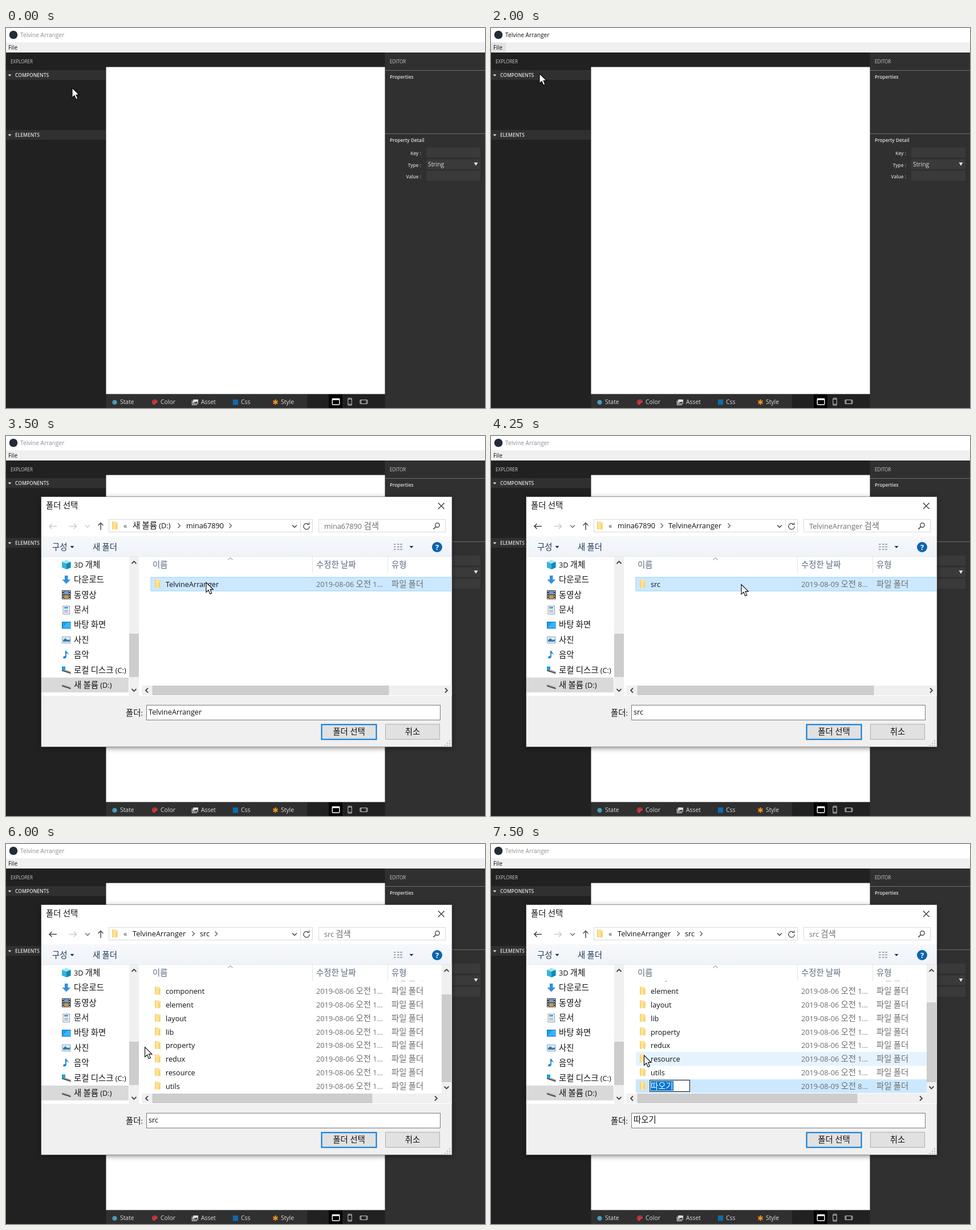
Animation of 840 by 667 pixels, one loop 8000 ms. Source, as an HTML page:

```html
<!DOCTYPE html>
<html lang="ko">
<head>
<meta charset="utf-8">
<title>Folder picker</title>
<style>
html, body { margin: 0; width: 100%; height: 100%; overflow: hidden; background: #212121; }
svg { display: block; width: 100%; height: 100%; }
text { font-family: 'Open Sans', 'Noto Sans CJK KR', 'Noto Sans CJK', 'Noto Sans', sans-serif; white-space: pre; }
.shadow { filter: drop-shadow(0 2px 5px rgba(0,0,0,.5)); }
</style>
</head>
<body>
<svg id="stage" viewBox="0 0 840 667">
  <defs>
    <clipPath id="listClip"><rect x="234" y="240.5" width="547" height="197.5"/></clipPath>
    <linearGradient id="bar" x2="0" y2="1"><stop stop-color="#f6f8fb"/><stop offset="1" stop-color="#eff3f9"/></linearGradient>
    <linearGradient id="gold"><stop stop-color="#f2c95c"/><stop offset=".3" stop-color="#ffe79f"/><stop offset="1" stop-color="#fbd980"/></linearGradient>
  </defs>
  <g id="app"></g><g id="head"></g><g id="dialog"></g><g id="content"></g>
  <path id="cursor" d="M0 0V17.3L4 13.5L6.8 20.2L9.8 18.9L7 12.4H12.3Z" fill="#fff" stroke="#000" stroke-width="1.1"/>
</svg>
<script>
const STEP = 250, LOOP = 8000;
const APP = 'Telvine Arranger', ROOT = 'TelvineArranger', USER = 'mina67890';
const ROW = 23.8;
const $ = id => document.getElementById(id);

const rect = (x, y, w, h, fill, extra = '') =>
  `<rect x="${x}" y="${y}" width="${w}" height="${h}" fill="${fill}" ${extra}/>`;
const box = (x, y, w, h, fill, line, lw = 1) =>
  rect(x + lw / 2, y + lw / 2, w - lw, h - lw, fill, `stroke="${line}" stroke-width="${lw}"`);
const line = (d, color, w = 1) => `<path d="${d}" fill="none" stroke="${color}" stroke-width="${w}"/>`;
const shape = (d, fill) => `<path d="${d}" fill="${fill}"/>`;
const dot = (x, y, r, fill) => `<circle cx="${x}" cy="${y}" r="${r}" fill="${fill}"/>`;
const text = (x, y, s, size, fill, extra = '') =>
  `<text x="${x}" y="${y}" font-size="${size}" fill="${fill}" ${extra}>${s}</text>`;
// Hangul is set a little larger than the Latin beside it
const label = (x, y, s, fill = '#111', extra = '') =>
  text(x, y, s.replace(/[가-힣]+/g, k => `<tspan font-size="14.4">${k}</tspan>`), 12.7, fill, extra);

const chevrons = { left: [3, -4, -1, 0, 3, 4], right: [-2, -4, 2, 0, -2, 4], up: [-4, 2, 0, -2, 4, 2], down: [-4, -2, 0, 2, 4, -2] };
const chevron = (x, y, dir, color = '#444', w = 1.5) => {
  const [a, b, c, d, e, f] = chevrons[dir];
  return line(`M${x + a} ${y + b}L${x + c} ${y + d}L${x + e} ${y + f}`, color, w);
};
const triangle = (x, y, w, h, fill) => shape(`M${x - w} ${y}h${2 * w}l${-w} ${h}z`, fill);
const arrow = (x, y, dir, color) =>
  line(`M${x - 6.5} ${y}h13M${x + dir * 2} ${y - 4.5}l${dir * 4.5} 4.5l${-dir * 4.5} 4.5`, color, 1.6);
const folder = (x, y) => shape(`M${x} ${y}h7l1 2h2v12H${x}z`, 'url(#gold)') +
  line(`M${x + 7.5} ${y + 5}v9`, '#eabf55', .8);

function drawApp() {
  const bold = 'font-weight="600"', right = 'text-anchor="end" font-weight="600"';
  const section = (y, s) => rect(0, y, 175, 17, '#303030') + triangle(6.5, y + 7.5, 3, 3.5, '#ddd') +
    text(16, y + 11.7, s, 8.5, '#ddd', bold);
  const tab = (x, s) => text(x, 660, s, 10.4, '#ddd');
  const field = (y, s) => text(728, y + 13, s, 8.3, '#ccc', right) + rect(737, y, 95, 17, '#3a3a3a');
  const spokes = [0, 60, 120].map(a => `<path d="M472.5 652v9.4" stroke="#f7941d" stroke-width="2" transform="rotate(${a} 472.5 656.7)"/>`).join('');
  return rect(0, 0, 840, 667, '#212121') + rect(0, 0, 840, 26, '#fff') + rect(0, 25, 840, 18, '#f0f0f0') +
    text(8, 61.5, 'EXPLORER', 8.1, '#ccc') + section(74, 'COMPONENTS') + section(179, 'ELEMENTS') +
    rect(664.5, 43, 175.5, 624, '#303030') + rect(175.5, 643, 352.5, 24, '#303030') +
    rect(175.5, 68.5, 489, 574, '#fff') +
    text(673, 61.5, 'EDITOR', 8.1, '#ccc') +
    line('M665 74.5H840M665 185.5H840', '#707070') +
    text(673, 89, 'Properties', 8.3, '#ddd', bold) + text(673, 200, 'Property Detail', 8.3, '#ddd', bold) +
    field(210, 'Key :') + field(230.5, 'Type :') + field(251, 'Value :') +
    text(740, 243, 'String', 10.4, '#ddd') + triangle(824, 236, 3.5, 6, '#ddd') +
    rect(566, 643, 24, 24, '#000') +
    dot(190.5, 657, 4, '#4a9fb8') + tab(200, 'State') +
    shape('M261 652c3 0 5 2 4.8 4.5c-.3 2-3 1-3.6 2.5c-.4 1.5-.5 2.5-2 2.4c-2.5-.2-4.4-2.4-4.3-5c.1-2.6 2.3-4.4 5.1-4.4z', '#d0383e') +
    [[258, 657], [259.3, 654.4], [262.5, 654.2]].map(p => dot(...p, .8, '#303030')).join('') + tab(271, 'Color') +
    rect(328, 652, 9, 8, '#ddd', 'rx="1"') + line('M326.5 654v7.5h8.5', '#ddd', 1.2) +
    shape('M329 659l2.5-3l1.5 1.5l1.5-2.5l2 4z', '#303030') + tab(342, 'Asset') +
    rect(398, 652, 9, 9.5, '#0c6cb0') + tab(412, 'Css') + spokes + tab(482, 'Style') +
    rect(572.2, 650.7, 12.6, 10.6, 'none', 'rx="1.5" stroke="#fff" stroke-width="1.4"') + rect(572, 650, 13, 3.2, '#fff') +
    rect(599.8, 649.6, 6.4, 12.8, 'none', 'rx="1" stroke="#ccc"') + line('M600 651.5h6M600 660.3h6', '#ccc') +
    rect(620.8, 652.8, 13, 6.8, 'none', 'rx="1" stroke="#ccc"') + line('M622.5 653v6.5M632.2 653v6.5', '#ccc');
}

function drawNav() {
  const names = ['3D 개체', '다운로드', '동영상', '문서', '바탕 화면', '사진', '음악', '로컬 디스크 (C:)', '새 볼륨 (D:)'];
  const y = i => 226 + i * 26.4;
  const drive = c => shape(`M98 ${c + 1}l3-1l12.5 4v4z`, '#c4c4c4') + shape(`M98 ${c + 1}l15.5 5v2.5l-15.5-5z`, '#555');
  const holes = [273, 277, 281, 285].map(h => rect(99, h - 1, 1.8, 2, '#ddd') + rect(110.4, h - 1, 1.8, 2, '#ddd')).join('');
  return rect(62, 424, 153, 26, '#d9d9d9') +
    names.map((s, i) => label(119, y(i) + 4.7, s)).join('') +
    shape('M98 221l8-3l7.5 3v10l-7.5 3l-8-3z', '#35b5dc') + shape('M98 221l8-3l7.5 3l-7.5 3z', '#a4e6f5') + shape('M106 224l7.5-3v10l-7.5 3z', '#1489b4') +
    shape('M103 245h5.5v7h4.5l-7.2 7.5l-7.3-7.5h4.5z', '#2f8fe0') +
    rect(98, 271, 15.5, 15.5, '#333') + rect(101.7, 272, 8, 6.3, '#6f9ccc') + rect(101.7, 279.3, 8, 6.3, '#c49a58') + holes +
    box(99.5, 298, 12.5, 15, '#fff', '#8395a5') + rect(102, 300, 7, 3, '#4d9ad4') + line('M102 305.5h7.5M102 307.5h7.5M102 309.5h7.5', '#7899b5') +
    box(98, 326, 15.5, 12, '#1ba1f2', '#0868ae') + shape('M99 337l9-10h5v10z', '#38b6ff') +
    box(98, 352, 15.5, 12, '#d8eefa', '#8da3b2') + shape('M100 361v-3l4-3l4 3l4-1v4z', '#397ba8') +
    shape('M104 377h1.8c.5 3 4.5 3.5 4.2 7.5c-.4-2-2-3-4.2-3v6c0 3-5.3 4.3-5.6 1.5c-.1-2 2-3.2 3.8-2.7z', '#1882d8') +
    drive(409) + rect(98, 404.5, 6, 6, '#18a0e8') + drive(436);
}

function drawDialog() {
  const grip = [[778, 534], [774, 538], [778, 538], [770, 542], [774, 542], [778, 542]].map(([x, y]) => rect(x - 1, y, 2, 2, '#bbb')).join('');
  const views = [190, 194.5, 199].map(y => line(`M680 ${y}h3.5M686 ${y}h3.5M691 ${y}h4`, '#8a8f96', 1.5)).join('');
  return `<g class="shadow">${rect(62, 107, 720, 438.5, '#fff')}</g>` +
    label(70, 127.2, '폴더 선택') + line('M758 117.5l10.5 10.5M768.5 117.5l-10.5 10.5', '#222', 1.2) +
    arrow(117, 158.5, 1, '#ccc') + line('M166 165v-12M161.5 157l4.5-4.5l4.5 4.5', '#555', 1.6) +
    box(180, 146, 358, 23, '#fff', '#d9d9d9') + line('M516.5 147v21', '#d9d9d9') + folder(186, 150) +
    label(206, 161.5, '«', '#444') + chevron(506, 158.5, 'down') +
    line('M530.5 154.8A5.2 5.2 0 1 0 532.2 158.5', '#555', 1.4) + line('M528 155.5h3.7v-3.7', '#555', 1.2) +
    box(548, 146, 223, 23, '#fff', '#d9d9d9') +
    `<circle cx="756.5" cy="156.5" r="3.7" fill="none" stroke="#555" stroke-width="1.5"/>` + line('M753.7 159.3l-4.2 4.2', '#555', 1.8) +
    rect(62, 176, 720, 35, 'url(#bar)') + line('M62 211.5H782', '#e3e7ed') +
    label(81, 199.5, '구성', '#1e395b') + triangle(116, 193, 3.5, 4, '#1e395b') + label(152, 199.5, '새 폴더', '#1e395b') +
    views + triangle(711, 193, 3.5, 4, '#1e395b') + dot(756, 195, 9, '#0a64ad') +
    text(756, 199.8, '?', 13, '#fff', 'text-anchor="middle" font-weight="700"') +
    drawNav() + rect(216, 212, 17, 244, '#f0f0f0') + rect(216, 347, 17, 76, '#cdcdcd') +
    chevron(224.5, 222, 'up', '#444', 1.8) + chevron(224.5, 446, 'down', '#444', 1.8) +
    label(257, 231, '이름', '#5a6a80') + label(544, 231, '수정한 날짜', '#5a6a80') + label(676, 231, '유형', '#5a6a80') +
    line('M537.5 212v28M669.5 212v28', '#e5e5e5') + chevron(393.5, 215.5, 'up', '#777', 1) +
    rect(62, 456, 720, 89.5, '#f0f0f0') + label(210, 490.5, '폴더:') +
    box(552.5, 505.5, 98, 28, '#e1e1e1', '#0078d7', 2) + label(601.5, 523.7, '폴더 선택', '#111', 'text-anchor="middle"') +
    box(665, 505.5, 96, 27.5, '#e1e1e1', '#adadad') + label(713, 523.7, '취소', '#111', 'text-anchor="middle"') + grip +
    rect(61.5, 106.5, 720.5, 439, 'none', 'stroke="#777" stroke-opacity=".6"');
}

function drawHead(step) {
  const active = step >= 3 && step < 10;
  let out = dot(13, 12, 7.3, '#252b3b') + text(25, 15.8, APP, 10.2, active ? '#111' : '#909090');
  if (active) out += rect(0, 26, 26, 16, '#e2e2e2');
  out += text(4, 37.7, 'File', 10.2, '#111');
  if (step >= 4 && step < 8) {
    const hover = Math.floor((cursorAt(step)[1] - 45) / 22);
    out += `<g class="shadow">${box(2, 42, 220, 115, '#f2f2f2', '#ccc')}</g>`;
    if (hover >= 0) out += rect(4, 45 + hover * 22, 216, 22, '#91c9f7');
    ['New Project', 'Open Project', 'Save Project', 'Close Project', 'Exit'].forEach((s, i) =>
      out += text(32, 59.7 + i * 22, s, 10.2, '#111'));
  }
  return out;
}

const folders = [
  { crumbs: [[222, '새 볼륨 (D:)'], [303], [316, USER], [393]], search: USER, rows: [ROOT] },
  { crumbs: [[222, USER], [299], [311, ROOT], [417]], search: ROOT, rows: ['src'] },
  { crumbs: [[222, ROOT], [328], [340, 'src'], [368]], search: 'src',
    rows: ['asset', 'common', 'component', 'element', 'layout', 'lib', 'property', 'redux', 'resource', 'utils'] }
];
const hovers = { 13: 0, 16: 0, 21: 5, 22: 6, 23: 6, 28: 8, 29: 8, 30: 8, 31: 8 };

function drawContent(step) {
  const depth = step < 15 ? 0 : step < 18 ? 1 : 2;
  const dir = folders[depth], deep = depth === 2, made = step >= 29;
  const rows = made ? [...dir.rows, '따오기'] : dir.rows;
  const scroll = !deep || step < 19 ? 0 : step < 20 ? 24.5 : made ? 73 : 49.1;
  const picked = made ? 10 : step === 14 || step === 17 ? 0 : -1;
  const edge = deep ? 764 : 782;

  let list = '';
  rows.forEach((name, i) => {
    const y = 260 + i * ROW - scroll;
    const today = depth === 1 || i === 10;
    if (i === picked) list += deep ? rect(254, y - 12, edge - 254, 24, '#cce8ff') : box(253.5, y - 12.5, 540, 25, '#cce8ff', '#99d1ff');
    else if (i === hovers[step]) list += rect(254, y - 12.5, edge - 254, 24.5, '#e5f3ff');
    list += folder(261, y - 8);
    if (i === 10) list += box(278, y - 11, 71, 21, '#fff', '#111') + rect(280, y - 9, 40, 17, '#0078d7') + label(280, y + 4.7, name, '#fff');
    else list += label(280, y + 4.7, name);
    list += label(544, y + 4.7, today ? '2019-08-09 오전 8...' : '2019-08-06 오전 1...', '#6d6d6d') + label(676, y + 4.7, '파일 폴더', '#6d6d6d');
  });

  let out = arrow(82.5, 158.5, -1, depth ? '#444' : '#ccc') + chevron(143, 158.5, 'down', depth ? '#666' : '#ccc', 1.3);
  dir.crumbs.forEach(([x, s]) => out += s ? label(x, 162, s) : chevron(x + .5, 157.5, 'right', '#555', 1.3));
  out += label(558, 162.5, dir.search + ' 검색', '#6d6d6d') + `<g clip-path="url(#listClip)">${list}</g>`;

  out += rect(238, 438, edge - 238, 17, '#f0f0f0') + rect(256.5, 438, deep ? 386 : 415, 17, '#cdcdcd') +
    chevron(246, 446.5, 'left', '#444', 1.8) + chevron(edge - 10, 446.5, 'right', '#444', 1.8);
  if (deep) {
    const size = made ? 140 : 154;
    const top = made ? 278 : 231 + 33 * scroll / 49.1;
    out += rect(764, 212, 17.5, 243, '#f0f0f0') + rect(764, top, 17, size, '#cdcdcd') +
      chevron(772.5, 222, 'up', '#444', 1.8) + chevron(772.5, 427.5, 'down', '#444', 1.8);
  }

  const value = made ? '따오기' : step >= 17 ? 'src' : step >= 14 ? ROOT : '';
  out += box(246, 472, 516, 27, '#fff', value ? '#7a7a7a' : '#0078d7');
  return out + (value ? label(250, 488.8, value) : line('M249.5 476v17', '#111'));
}

// [step, x, y]: the pointer glides between stops, sampled once per step
const stops = [[0, 116, 105], [3, 12, 33], [4, 13, 36], [7, 84, 80], [8, 85, 80], [10, 396.5, 130], [13, 350, 256], [15, 352, 258],
  [17, 439, 260.5], [19, 439, 262], [20, 420, 300], [21, 359, 349], [24, 243.6, 356.5], [25, 243.6, 356.5], [30, 268.5, 371], [32, 268.5, 371]];
function cursorAt(step) {
  const i = stops.findIndex(s => s[0] > step);
  const [a, x, y] = stops[i - 1], [b, x2, y2] = stops[i];
  const k = (step - a) / (b - a);
  return [x + (x2 - x) * k, y + (y2 - y) * k];
}

$('app').innerHTML = drawApp();
$('dialog').innerHTML = drawDialog();
let last = -1;
function render(time) {
  const step = Math.floor((time % LOOP) / STEP);
  if (step !== last) {
    last = step;
    const open = step >= 10;
    $('head').innerHTML = drawHead(step);
    $('dialog').style.display = open ? '' : 'none';
    $('content').innerHTML = open ? drawContent(step) : '';
    $('cursor').setAttribute('transform', `translate(${cursorAt(step)})`);
  }
  requestAnimationFrame(() => render(performance.now()));
}
render(performance.now());
</script>
</body>
</html>
```
